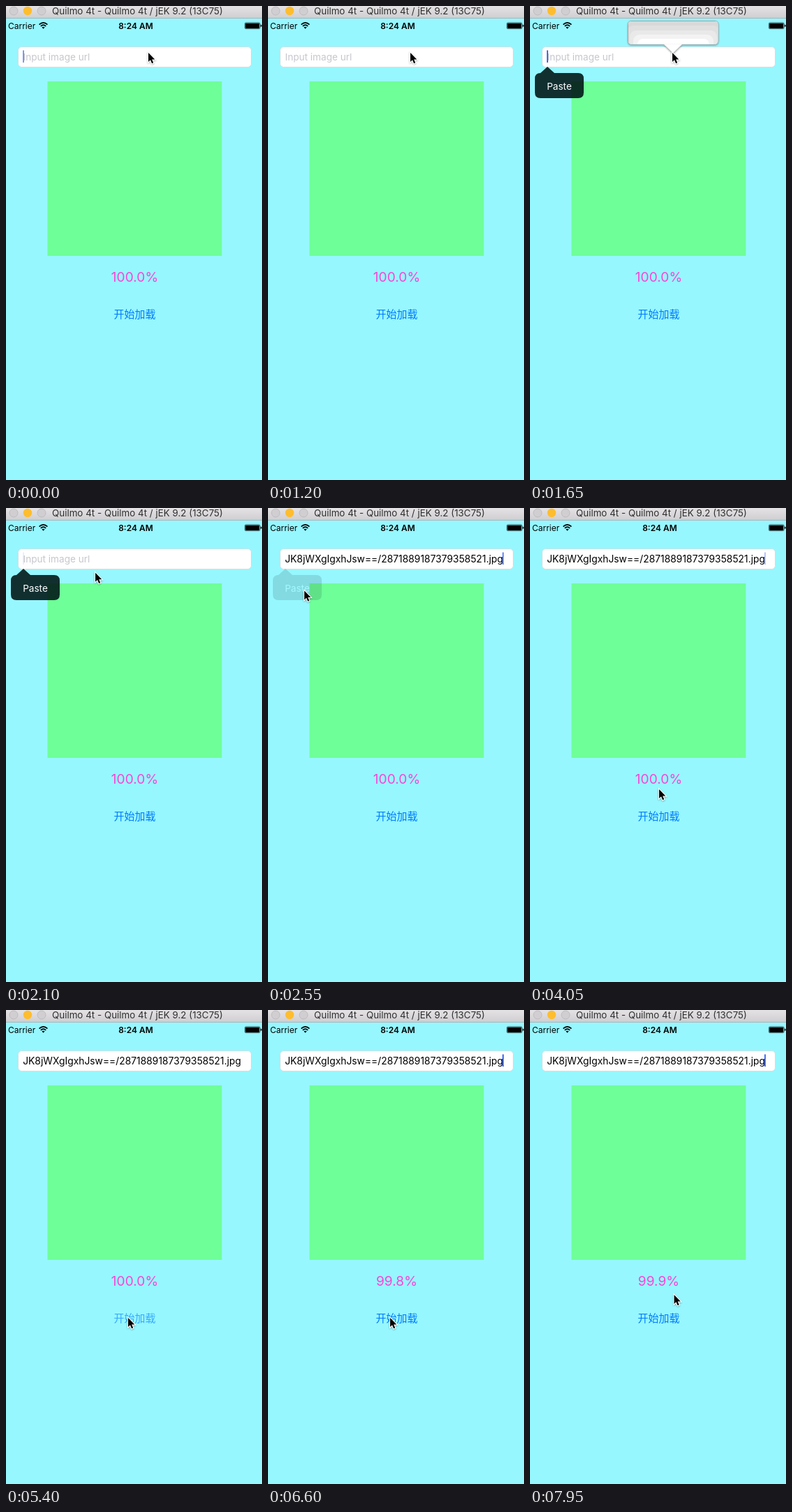
An HTML page that plays this animation: 367 px wide and 679 px high, repeating every 8 s.

```html
<!DOCTYPE html>
<html lang="zh-CN">
<head>
<meta charset="utf-8">
<title>Image loader</title>
<style>
  html, body { margin: 0; width: 100%; height: 100%; overflow: hidden; background: #96f7ff; }
  svg { display: block; width: 367px; height: 679px; }
  text { font-family: Inter, "Noto Sans", sans-serif; white-space: pre; }
  .mid { text-anchor: middle; }
  #button { font: 15px "Noto Sans CJK SC", "Noto Sans CJK", sans-serif; fill: #007aff; }
</style>
</head>
<body>
<svg viewBox="0 0 367 679" xmlns="http://www.w3.org/2000/svg">
  <defs>
    <linearGradient id="bar" x1="0" y1="0" x2="0" y2="1">
      <stop offset="0" stop-color="#e4e2e4"/><stop offset="1" stop-color="#d0ced0"/>
    </linearGradient>
    <filter id="shade" x="-30%" y="-30%" width="160%" height="170%">
      <feDropShadow dx="0" dy="1" stdDeviation="1" flood-opacity=".35"/>
    </filter>
    <clipPath id="lens"><rect x="141" y="22" width="128.5" height="32.5" rx="4.5"/></clipPath>
  </defs>

  <rect width="367" height="679" fill="#96f7ff"/>

  <!-- window bar -->
  <rect width="367" height="17" fill="url(#bar)"/>
  <rect y="17" width="367" height="1" fill="#a9b5b8"/>
  <circle cx="11" cy="7" r="6" fill="#d0ced0" stroke="#b8b6b8" stroke-width=".8"/>
  <circle cx="31" cy="7" r="6.2" fill="#fdbd2f"/>
  <circle cx="51" cy="7" r="6" fill="#d0ced0" stroke="#b8b6b8" stroke-width=".8"/>
  <text x="66" y="12" font-size="13.4" fill="#303030">Quilmo 4t - Quilmo 4t / jEK 9.2 (13C75)</text>

  <!-- status bar -->
  <text x="3" y="32.5" font-size="12">Carrier</text>
  <g fill="none" stroke="#000" stroke-width="1.7">
    <path d="M47.6 26.6Q53.5 21 59.4 26.6"/>
    <path d="M49.8 29Q53.5 25.4 57.2 29"/>
  </g>
  <path d="M51.4 30.6Q53.5 28.8 55.6 30.6L53.5 32.8Z"/>
  <text class="mid" x="186" y="32.5" font-size="12" font-weight="600">8:24 AM</text>
  <rect x="342.4" y="23.9" width="21.7" height="8.8" rx="1.6" fill="none" stroke="#000" stroke-width=".6"/>
  <rect x="343.2" y="24.7" width="20.1" height="7.2" rx=".8"/>
  <path d="M365 26.5Q366.5 26.8 366.5 28.3T365 30.1Z"/>

  <!-- form -->
  <rect x="17.5" y="58.5" width="334" height="29" rx="5" fill="#fff" stroke="#cbe0e3" stroke-width=".9"/>
  <text id="hint" x="24.5" y="77.5" font-size="13.6" fill="#c7c7cd">Input image url</text>
  <text id="url" x="337" y="77.5" font-size="13.85" text-anchor="end">JK8jWXgIgxhJsw==/2871889187379358521.jpg</text>
  <rect id="caret" y="63.5" width="2" height="17.5" fill="#426bf2"/>
  <rect x="59.5" y="108" width="250" height="250" fill="#6eff99"/>
  <text class="mid" id="percent" x="184.5" y="395" font-size="19.2" fill="#f846d8"></text>
  <text class="mid" id="button" x="184.5" y="446.5">开始加载</text>

  <g id="paste">
    <path d="M15 96L25 87L35 96H69Q77 96 77 104V124Q77 132 69 132H15Q7 132 7 124V104Q7 96 15 96Z" fill="#001414" fill-opacity=".88"/>
    <text class="mid" x="42" y="120" font-size="13.6" fill="#fff">Paste</text>
  </g>

  <g id="loupe">
    <path d="M145 21.5H265Q270 21.5 270 26.5V50Q270 55 265 55H218.5L205 68L191.5 55H145Q140.5 55 140.5 50V26.5Q140.5 21.5 145 21.5Z" fill="#fff" stroke="#8e9a9c" stroke-width=".8" filter="url(#shade)"/>
    <g clip-path="url(#lens)">
      <rect x="140" y="21" width="131" height="35" fill="#d9d9d9"/>
      <rect x="140" y="28" width="131" height="40" rx="8" fill="#e0e0e0"/>
      <rect x="143" y="35" width="125" height="40" rx="9" fill="#e9e9e9"/>
      <rect x="148" y="41" width="115" height="40" rx="9" fill="#f3f3f3"/>
      <rect x="154" y="47" width="103" height="40" rx="8" fill="#fff"/>
    </g>
  </g>

  <path id="cursor" d="M.6 1V14L3.5 11.3L5.7 16.2L7.8 15.3L5.7 10.6H9.9Z" stroke="#fff" stroke-width="2" paint-order="stroke" filter="url(#shade)"/>
</svg>

<script>
const LOOP = 8000, TICK = 150;
const PASTE = 2550, PRESS = 5100, LOAD = 5700;

const home = { x: 203.5, y: 66 };
const moves = [
  { from: 1800, to: 2400, x: 51.5, y: 117.5 },
  { from: 2700, to: 3450, x: 182, y: 116 },
  { from: 3450, to: 4050, x: 184.5, y: 402 },
  { from: 4050, to: 4500, x: 174.5, y: 440 },
  { from: 7200, to: 7950, x: 206, y: 407 }
];

const $ = id => document.getElementById(id);
const show = (id, alpha) => $(id).setAttribute("opacity", Number(alpha));
const ramp = (t, a, b) => Math.min(1, Math.max(0, (t - a) / (b - a)));
const pulse = (t, a, b, c, d) => ramp(t, a, b) - ramp(t, c, d);
const smooth = k => k * k * (3 - 2 * k);

function pointer(t) {
  let { x, y } = home;
  for (const m of moves) {
    const k = smooth(ramp(t, m.from, m.to));
    x += (m.x - x) * k;
    y += (m.y - y) * k;
  }
  return `translate(${x} ${y})`;
}

function percent(t) {
  if (t < LOAD) return 100;
  const left = 1 - ramp(t, LOAD, 6600);
  return 99.8 * (1 - left * left) + (t >= 7500 ? 0.1 : 0);
}

function draw(t) {
  const pasted = t >= PASTE;
  show("hint", !pasted);
  show("url", pasted);
  $("caret").setAttribute("x", pasted ? 336 : 24);
  show("caret", pulse((t + 800) % 1000, 210, 390, 745, 920));
  show("paste", pulse(t, 1350, 1650, 2400, 2575));
  show("loupe", t >= 1500 && t < 1800);
  show("button", 1 - 0.75 * pulse(t, PRESS, PRESS + 150, PRESS + 150, PRESS + 450));
  $("percent").textContent = percent(t).toFixed(1) + "%";
  $("cursor").setAttribute("transform", pointer(t));
}

const start = performance.now();
function frame() {
  const t = (performance.now() - start) % LOOP;
  draw(Math.floor(t / TICK) * TICK);
  requestAnimationFrame(frame);
}
frame();
</script>
</body>
</html>
```
